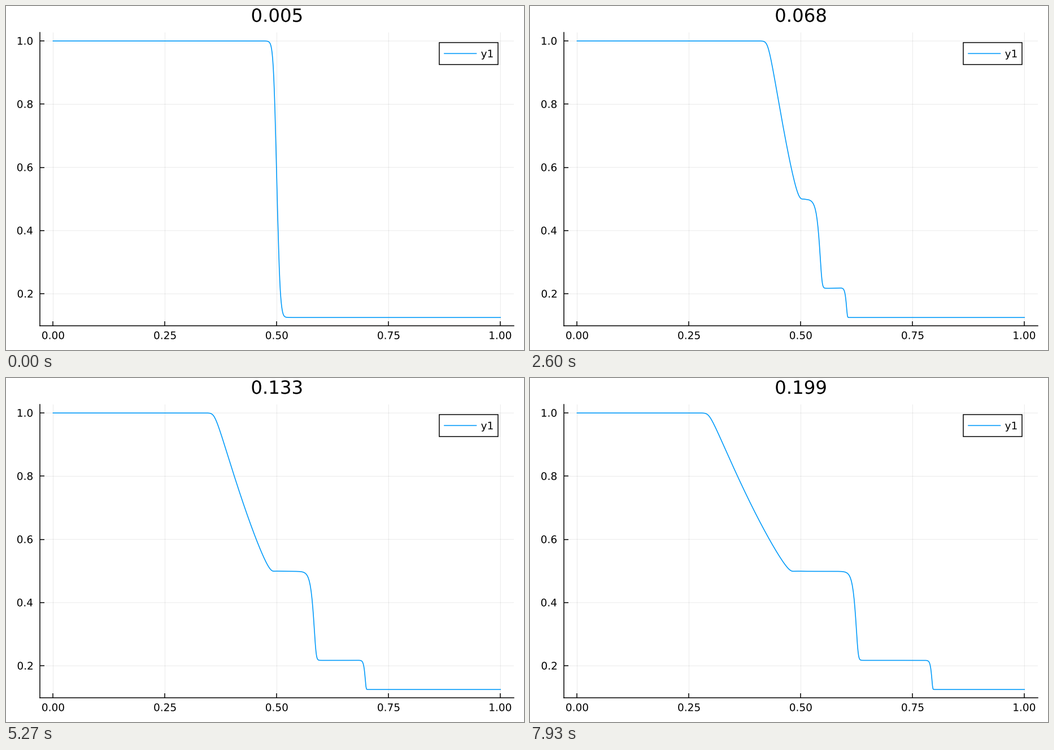
Write a matplotlib script that moves like this. It is 917x611 px and loops after 8000 ms.

```python
import numpy as np
import matplotlib.pyplot as plt
from matplotlib.animation import FuncAnimation
from matplotlib.patches import PathPatch, Rectangle
from matplotlib.path import Path
from matplotlib.textpath import TextPath

W, H, DPI = 917, 611, 100
PX = 72 / DPI                 # points per pixel
FRAMES, INTERVAL = 120, 66.63
STEP = 0.001628               # model time per frame
FIRST = 3                     # steps already taken at the first frame
BLUE = "#009afa"
LEFT, RIGHT, TOP, BOTTOM = 59.7, 899.0, 47.4, 568.0
XLIM, YLIM = (-0.03, 1.03), (0.09875, 1.02625)

plt.rcParams["font.family"] = "DejaVu Sans"


def shock_tube(cells=800, sub=40, gamma=5 / 3, width=0.0054,
               drag=0.0031, visc=0.0012):
    """Lagrangian gas flow; each cell keeps its mass and its entropy."""
    edge = np.linspace(0, 1, cells + 1)
    mid = (edge[1:] + edge[:-1]) / 2
    rho = 0.125 + 0.875 * 0.5 * (1 - np.tanh((mid - 0.5) / width))
    mass = rho / cells
    entropy = 0.6 * rho ** (1 - gamma)
    node_mass = (mass[1:] + mass[:-1]) / 2
    u = np.zeros(cells + 1)
    dt = STEP / sub
    curves = []
    for n in range(1, FIRST + FRAMES):
        for _ in range(sub):
            dx = np.diff(edge)
            rho = mass / dx
            squeeze = np.maximum(-np.diff(u) / dx, 0)
            speed = np.abs(u[1:] + u[:-1]) / 2
            q = rho * squeeze * (drag * speed + visc ** 2 * squeeze)
            u[1:-1] -= dt * np.diff(entropy * rho ** gamma + q) / node_mass
            edge = edge + dt * u
        if n >= FIRST:
            mid = (edge[1:] + edge[:-1]) / 2
            curves.append((np.r_[0, mid, 1],
                           np.r_[1, mass / np.diff(edge), 0.125]))
    return curves


def px_x(v):
    return LEFT + (v - XLIM[0]) / (XLIM[1] - XLIM[0]) * (RIGHT - LEFT)


def px_y(v):
    return BOTTOM - (v - YLIM[0]) / (YLIM[1] - YLIM[0]) * (BOTTOM - TOP)


def text_path(x, y, text, size=18.5, align=0.5):
    """Outline of a text on baseline y; align 0 is left, 1 is right."""
    glyphs = TextPath((0, 0), text, size=size)
    box = glyphs.get_extents()
    shift = x - box.x0 - align * box.width
    return Path(glyphs.vertices * [1, -1] + [shift, y], glyphs.codes)


curves = shock_tube()

fig = plt.figure(figsize=(W / DPI, H / DPI), dpi=DPI, facecolor="white")
ax = fig.add_axes([LEFT / W, 1 - BOTTOM / H,
                   (RIGHT - LEFT) / W, (BOTTOM - TOP) / H])
ax.set_xlim(*XLIM)
ax.set_ylim(*YLIM)

# overlay in pixels, y downwards
page = fig.add_axes([0, 0, 1, 1])
page.set_xlim(0, W)
page.set_ylim(H, 0)
page.axis("off")


def label(*args, **kw):
    return page.add_patch(PathPatch(text_path(*args, **kw),
                                    facecolor="black", linewidth=0))


xticks = [0, 0.25, 0.5, 0.75, 1]
yticks = [0.2, 0.4, 0.6, 0.8, 1]
ax.set_xticks(xticks)
ax.set_yticks(yticks)
ax.tick_params(direction="in", length=8 * PX, width=1.5 * PX,
               labelbottom=False, labelleft=False)
ax.set_axisbelow(True)
ax.grid(color="black", alpha=0.1, linewidth=0.8 * PX, snap=False)
for side in ("top", "right"):
    ax.spines[side].set_visible(False)
for side in ("left", "bottom"):
    ax.spines[side].set_linewidth(1.5 * PX)

for v in xticks:
    label(px_x(v), 591.6, f"{v:.2f}")
for v in yticks:
    label(47, px_y(v) + 6.6, f"{v:.1f}", align=1)

# legend
page.add_patch(Rectangle((767, 65), 104, 39, facecolor="white",
                         edgecolor="black", linewidth=1.5 * PX))
page.plot([776, 832.5], [84.4, 84.4], color=BLUE, linewidth=1.6 * PX,
          snap=False)
label(841.2, 91.2, "y1", align=0)

title = label(479.5, 28.1, "0", size=32.4)
line, = ax.plot([], [], color=BLUE, linewidth=1.6 * PX)


def draw(i):
    line.set_data(*curves[i])
    time = str(round((i + FIRST) * STEP, 3))
    title.set_path(text_path(479.5, 28.1, time, size=32.4))
    return line, title


anim = FuncAnimation(fig, draw, frames=FRAMES, interval=INTERVAL,
                     init_func=lambda: draw(0), repeat=True, repeat_delay=0)
plt.show()
```
